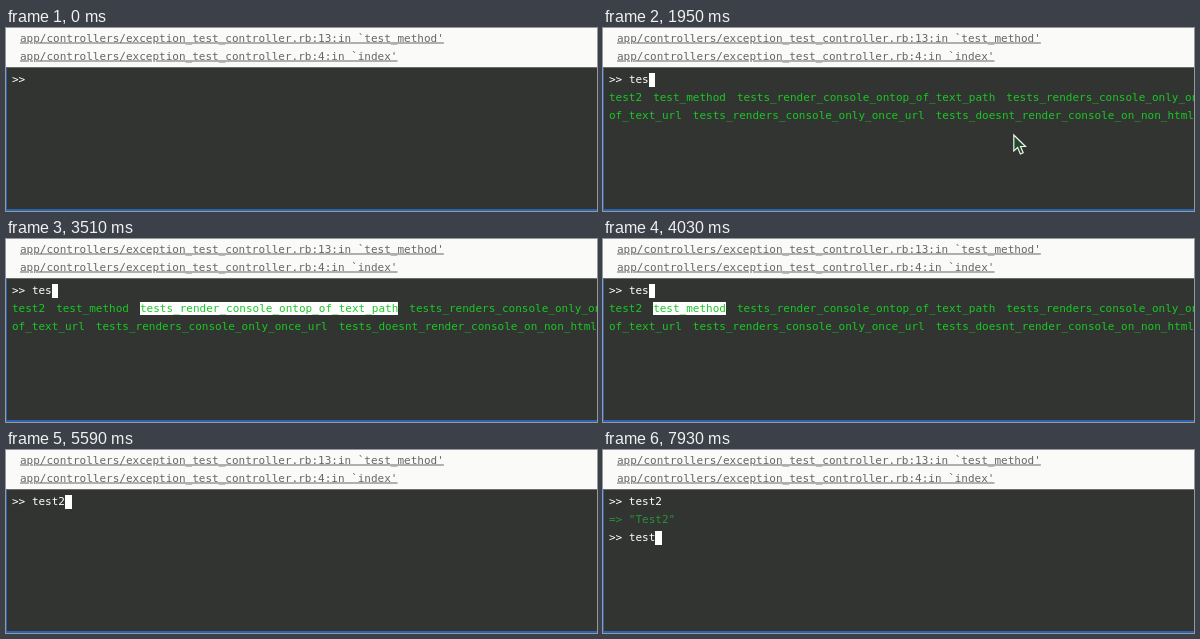
An HTML page that plays this animation: 591x183 px, repeating every 8000 ms.

```html
<!DOCTYPE html>
<html lang="en">
<head>
<meta charset="utf-8">
<title>Console autocomplete</title>
<style>
  html, body { margin: 0; width: 100%; height: 100%; overflow: hidden; }
  body {
    position: relative;
    background: #fafaf9;
    font: 11px/18px "DejaVu Sans Mono", monospace;
    white-space: pre;
  }
  .trace {
    position: absolute; left: 13.5px; top: 1px;
    color: #666;
    transform: translateY(.5px);
    will-change: transform;
  }
  .trace div { text-decoration: underline; }
  .console {
    position: absolute; inset: 39px 0 0;
    box-sizing: border-box;
    padding: 3px 0 0 5px;
    border: solid #2a62b4; border-width: 1px 0 2px 1px;
    border-top-color: #6b6c6b;
    background: #323432;
    color: #fff;
    overflow: hidden;
  }
  .caret { padding-bottom: 1px; background: #fff; }
  .result { color: #2a9238; }
  .words { color: #1ac724; }
  .words span { margin-right: 11px; }
  .words .on { background: #fff; }
  .mouse { position: absolute; left: 0; top: 0; overflow: visible; }
  [hidden] { display: none; }
</style>
</head>
<body>
<div class="trace"><div>app/controllers/exception_test_controller.rb:13:in `test_method'</div><div>app/controllers/exception_test_controller.rb:4:in `index'</div></div>
<div class="console"><div id="done" hidden><div>&gt;&gt; test2</div><div class="result">=&gt; "Test2"</div></div><div>&gt;&gt; <span id="input"></span><span id="caret"> </span></div><div id="words" class="words" hidden><div><span>test2</span><span>test_method</span><span>tests_render_console_ontop_of_text_path</span><span>tests_renders_console_only_once_path</span></div><div><span>of_text_url</span><span>tests_renders_console_only_once_url</span><span>tests_doesnt_render_console_on_non_html</span></div></div></div>
<svg id="mouse" class="mouse" width="14" height="21" hidden>
  <path d="M.8 1V17L4.6 13.5 7.4 20 10.2 18.8 7.5 12.5H12.5Z" fill="#234a28" stroke="#eef2ee" stroke-width="1.2"/>
</svg>
<script>
const LOOP = 8000, STEP = 130;
const $ = id => document.getElementById(id);
const words = $('words').querySelectorAll('span');

// Each entry applies from its time on: [ms, changes]
const script = [
  [0, { text: '', caret: false, list: false, pick: -1, done: false }],
  [780, { caret: true }],
  [1040, { text: 't' }],
  [1300, { text: 'te' }],
  [1430, { text: 'tes' }],
  [1820, { list: true }],
  [2470, { pick: 0 }],
  [2990, { pick: 1 }],
  [3380, { pick: 2 }],
  [4030, { pick: 1 }],
  [4290, { pick: 0 }],
  [5070, { text: 'test2', list: false, pick: -1 }],
  [6110, { text: '', done: true }],
  [7150, { text: 't' }],
  [7410, { text: 'te' }],
  [7670, { text: 'tes' }],
  [7800, { text: 'test' }]
];

// Pointer path: [ms, x, y]
const path = [[130, 436, 186], [650, 410, 106], [2080, 410, 106], [2470, 440, 190]];

function pointer(t) {
  const i = path.findIndex(p => p[0] > t);
  if (i < 1) return null;
  const [t0, x0, y0] = path[i - 1], [t1, x1, y1] = path[i];
  const u = (t - t0) / (t1 - t0), e = u * u * (3 - 2 * u);
  return [x0 + (x1 - x0) * e, y0 + (y1 - y0) * e];
}

function draw(time) {
  const t = Math.floor(time % LOOP / STEP) * STEP;
  const s = Object.assign({}, ...script.filter(e => e[0] <= t).map(e => e[1]));
  $('input').textContent = s.text;
  $('caret').classList.toggle('caret', s.caret);
  $('done').hidden = !s.done;
  $('words').hidden = !s.list;
  words.forEach((w, i) => w.classList.toggle('on', i === s.pick));

  const at = pointer(t), mouse = $('mouse');
  mouse.toggleAttribute('hidden', !at);
  if (at) mouse.style.transform = `translate(${at[0]}px, ${at[1]}px)`;
}

const start = performance.now();
function tick() {
  draw(performance.now() - start);
  requestAnimationFrame(tick);
}
tick();
</script>
</body>
</html>
```
